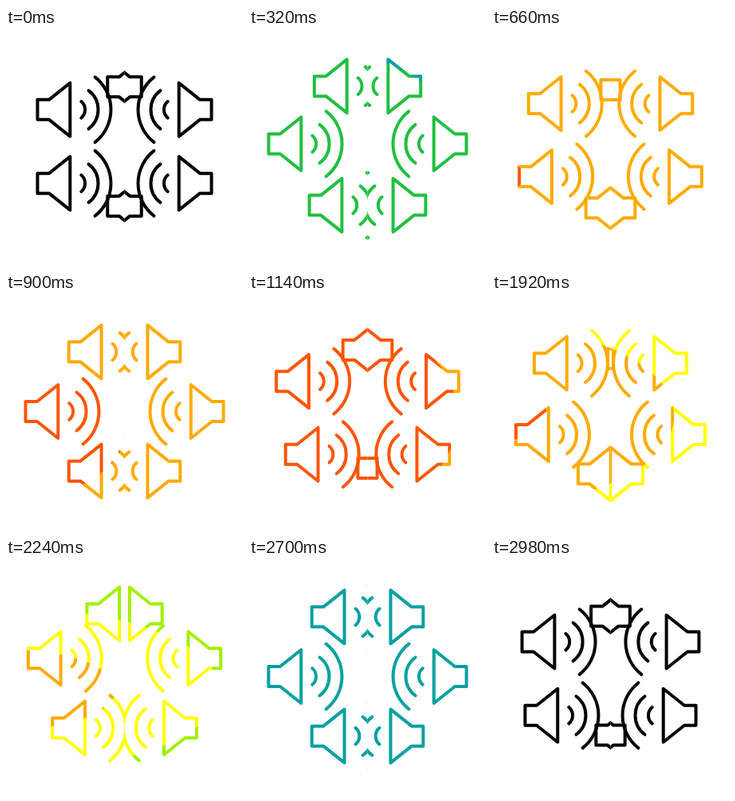
Animation, 297 px wide and 297 px high, one loop 3 s. Source, as an HTML page with a canvas:

```html
<!DOCTYPE html>
<html lang="en">
<head>
<meta charset="utf-8">
<title>Speaker ring</title>
<style>
  html, body { margin: 0; width: 100%; height: 100%; overflow: hidden; background: #fff; }
  canvas { display: block; width: 297px; height: 297px; }
</style>
</head>
<body>
<canvas id="stage" width="297" height="297"></canvas>
<script>
const SIZE = 297, MID = SIZE / 2, LOOP = 3000, STEP = 20;
const COUNT = 5, ORBIT = 78.5, REACH = 400;
const ctx = document.getElementById('stage').getContext('2d');

// Speaker facing right, centred on 0,0, with three sound waves
const speaker = new Path2D(
  'M-45.5 -12.5H-31L-4.7 -33.5V33.5L-31 12.5H-45.5Z' +
  'M9.3 -10.3A13.5 13.5 0 0 1 9.3 10.3' +
  'M18.5 -24A30 30 0 0 1 18.5 24' +
  'M26.6 -40.8A51.8 51.8 0 0 1 26.6 40.8');

const bands = ['#ff5500', '#ffaa00', '#ffff00', '#a0f000', '#20c040', '#00a0a0', '#004c4c', '#000'];

// time, centre x, centre y, horizontal squash, band at the centre, bands per pixel outwards
const glow = [
  [0, 0, 186, 0.6, 7.2, 0.004],
  [660, 0, 186, 0.6, 0.86, 0.006],
  [1140, 0, 155, 0.6, 0.058, 0.006],
  [1600, 0, 143, 0.6, 0.16, 0.006],
  [2240, 15, 165, 0.4, 1.06, 0.0192],
  [2700, 15, 165, 0.4, 5.1, 0.004],
  [3000, 0, 186, 0.6, 7.2, 0.004]
];

function glowAt(t) {
  const i = glow.findIndex(key => key[0] > t);
  const a = glow[i - 1], b = glow[i];
  const k = (t - a[0]) / (b[0] - a[0]);
  return a.map((v, n) => v + (b[n] - v) * k);
}

function drawHalf(t) {
  ctx.save();
  ctx.beginPath();
  ctx.rect(0, 0, MID, SIZE);
  ctx.clip();
  for (let i = 0; i < COUNT; i++) {
    const angle = 2 * Math.PI * (t / LOOP + i / COUNT);
    ctx.save();
    ctx.translate(MID + ORBIT * Math.cos(angle), MID + ORBIT * Math.sin(angle));
    ctx.stroke(speaker);
    ctx.restore();
  }
  ctx.restore();
}

function tint(t) {
  const [, x, y, squash, first, slope] = glowAt(t);
  const fill = ctx.createRadialGradient(0, 0, 0, 0, 0, REACH);
  bands.forEach((color, i) => {
    const edge = n => Math.min(1, Math.max(0, (n - first) / slope / REACH));
    const from = i ? edge(i) : 0;
    const to = i < bands.length - 1 ? edge(i + 1) : 1;
    if (to > from) {
      fill.addColorStop(from, color);
      fill.addColorStop(to, color);
    }
  });
  ctx.save();
  ctx.globalCompositeOperation = 'source-in';
  ctx.translate(x, y);
  ctx.scale(1 / squash, 1);
  ctx.fillStyle = fill;
  ctx.fillRect(-REACH, -REACH, 2 * REACH, 2 * REACH);
  ctx.restore();
}

function draw(now) {
  const t = Math.floor((now % LOOP) / STEP) * STEP;
  ctx.clearRect(0, 0, SIZE, SIZE);
  ctx.lineWidth = 4;
  ctx.lineCap = ctx.lineJoin = 'round';
  drawHalf(t);
  ctx.save();
  ctx.translate(SIZE, 0);
  ctx.scale(-1, 1);
  drawHalf(t);
  ctx.restore();
  tint(t);
}

const start = performance.now();
function tick() {
  draw(performance.now() - start);
  requestAnimationFrame(tick);
}
tick();
</script>
</body>
</html>
```
